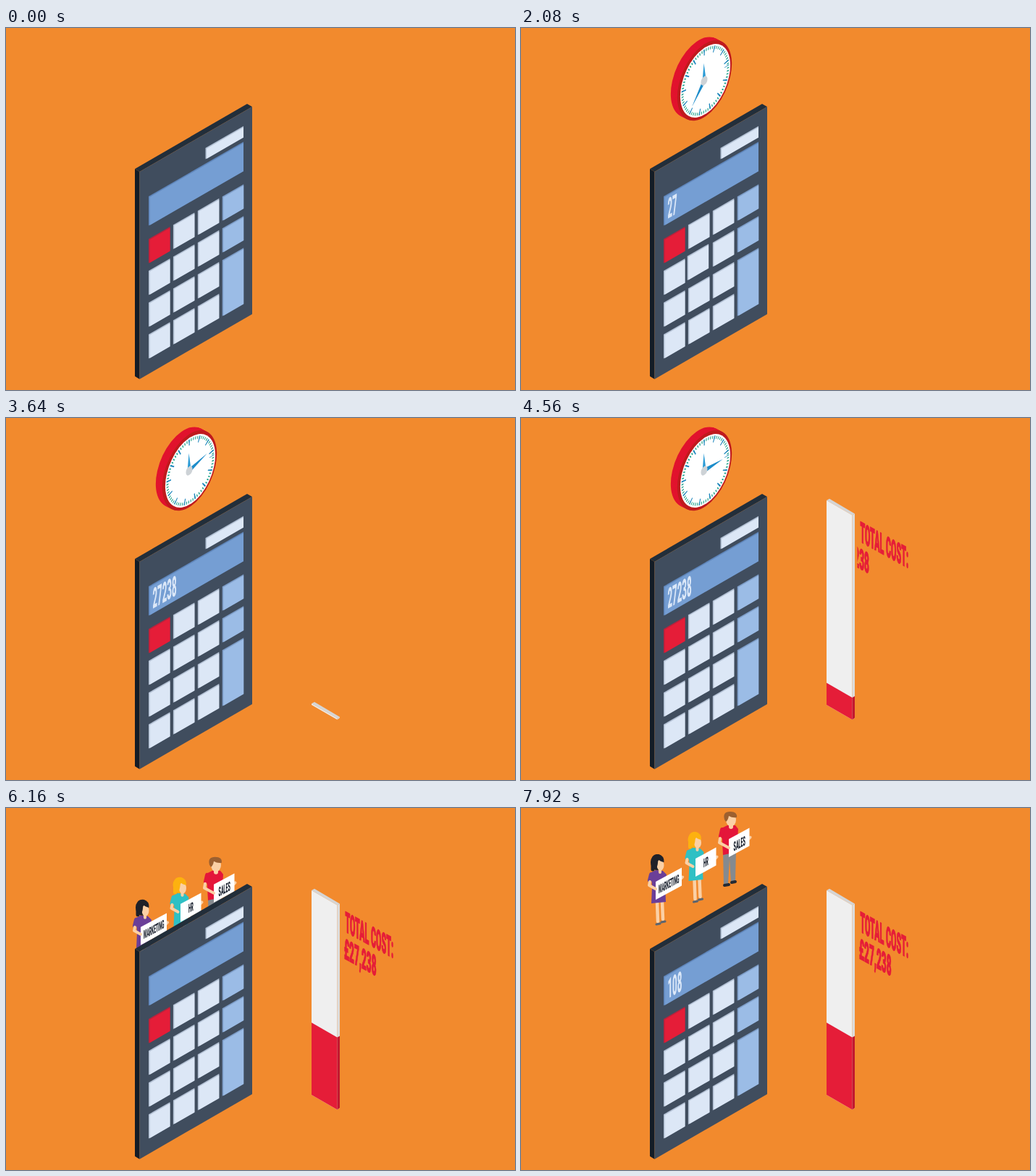
Animation of 703x501 px, one loop 8 s. Source, as an HTML page:

```html
<!DOCTYPE html>
<html lang="en">
<head>
<meta charset="utf-8">
<title>Cost calculator</title>
<style>
html, body { margin: 0; width: 100%; height: 100%; overflow: hidden; background: #f28a2d; }
svg { display: block; width: 100vw; height: 100vh; }
text { font-family: Roboto, "Liberation Sans", sans-serif; font-weight: 900; }
</style>
</head>
<body>
<svg id="stage" viewBox="0 0 703 501"></svg>
<script>
const LOOP = 8000;
const SLOPE = 0.577;
const SKIN = '#fbd0a5';
const RED = '#e51d38';

const stage = document.getElementById('stage');
const clamp = v => Math.min(1, Math.max(0, v));
const span = (t, from, to) => clamp((t - from) / (to - from));
const smooth = p => p * p * (3 - 2 * p);
const easeOut = p => 1 - (1 - p) ** 2;
const easeInOut = p => p < 0.5 ? 4 * p ** 3 : 1 - 4 * (1 - p) ** 3;
const easeInBack = p => p * p * (2.3 * p - 1.3);

const poly = (points, fill, extra = '') => `<polygon points="${points}" fill="${fill}" ${extra}/>`;
const line = (d, color, width) =>
  `<path d="${d}" fill="none" stroke="${color}" stroke-width="${width}" stroke-linecap="round" stroke-linejoin="round"/>`;
const ellipse = (cx, cy, rx, ry, fill) =>
  `<ellipse cx="${cx}" cy="${cy}" rx="${rx}" ry="${ry}" fill="${fill}"/>`;

// Upright panel whose top edge climbs to the right.
const panel = (x, y, w, h, fill) => {
  const rise = w * SLOPE;
  return poly(`${x},${y} ${x + w},${y - rise} ${x + w},${y - rise + h} ${x},${y + h}`, fill);
};
const bevelled = (x, y, w, h, fill, edge) =>
  panel(x, y, w, h, edge) + panel(x + 1.6, y + 0.9, w - 1.6, h - 1.5, fill);

// ---- clock ----
const FACE = '34.5 -24 2 45';
const disc = (x, y, r, fill) =>
  `<circle r="${r}" fill="${fill}" transform="matrix(${FACE} ${x} ${y})"/>`;
const ring = (r, width, color, count, dash) =>
  `<circle r="${r}" fill="none" stroke="${color}" stroke-width="${width}" pathLength="${count}"
    stroke-dasharray="${dash} ${1 - dash}" stroke-dashoffset="${dash / 2}"/>`;

function clockMarkup() {
  let rim = '';
  for (let i = 9; i > 0; i--) rim += disc(253.5 - i, 72.7 - i * 0.52, 1.09, '#e1132d');
  return `<g id="clock">${rim}
    ${disc(253.5, 72.7, 1.09, '#bf1a1d')}${disc(254.5, 73, 1, '#fff')}
    <g transform="matrix(${FACE} 254.5 73)">
      ${ring(0.91, 0.08, '#18a088', 60, 0.38)}${ring(0.86, 0.18, '#1d86bd', 12, 0.09)}
    </g>
    <g transform="matrix(${FACE} 253 73)">
      ${poly('-.075,0 .075,0 0,-.53', '#2a9bd6', 'transform="rotate(2)"')}
      ${poly('-.075,0 .075,0 0,-.74', '#1c8cca', 'id="minute"')}
      <circle r=".13" fill="#cdd2d6"/>
    </g></g>`;
}

// ---- people ----
function board(x, y, w, h, label, tx, ty, size) {
  return line(`M${x + w - 1} ${y - w * 0.54 + 15}l2 -2`, SKIN, 4) +
    poly(`${x},${y} ${x + w},${y - w * 0.54} ${x + w},${y - w * 0.54 + h} ${x},${y + h}`, '#fff') +
    `<text transform="matrix(.3 -.162 0 1 ${tx} ${ty})" font-size="${size}" fill="#1c2330">${label}</text>`;
}

function woman(x, y, hair, dress, sign) {
  return `<g transform="translate(${x} ${y})">
    ${line('M0 66L1 93', SKIN, 4.5)}${line('M7 66L8 90', SKIN, 4.5)}
    ${line('M-1 97l5 -1', '#5b6570', 3)}${line('M6 94l5 -1', '#5b6570', 3)}
    ${poly('-8,25 -2,22 8,23 13,28 11,42 12,66 -8,68 -7,46', dress)}
    ${ellipse(0, 11, 9, 11, hair)}${line('M-6 12V21', hair, 5)}
    ${ellipse(4.5, 15, 5, 7.5, SKIN)}${line('M4 20v5', SKIN, 4)}
    <path d="M-8 14Q-9 0 2 0Q10 2 9.5 11Q3 10 1 6Q2 14 -2 22Z" fill="${hair}"/>
    ${line('M-8 28L-10 36', dress, 6)}
    </g>${sign}<g transform="translate(${x} ${y})">
    ${line('M-10 38L-11 43L-2 48', SKIN, 4)}</g>`;
}

function man(x, y, sign) {
  return `<g transform="translate(${x} ${y})">
    ${poly('-10,54 8,54 7,96 1,98 -1,66 -3,100 -9,101', '#858a8f')}
    ${line('M-8 102l6 -1', '#252a33', 4)}${line('M2 98l5 -1', '#252a33', 4)}
    ${poly('-12,23 -4,19 7,19 11,24 9,56 -10,60', '#e4163a')}
    ${ellipse(1, 11, 7, 9.5, SKIN)}${line('M1 18v3', SKIN, 6)}
    <path d="M-8 11Q-11 0 0 0Q10 0 9 8Q3 9 -2 6Q-3 12 -6 14Z" fill="#9c6030"/>
    ${line('M-11 25L-13 34', '#e4163a', 6)}
    </g>${sign}<g transform="translate(${x} ${y})">
    ${line('M-14 37L-15 43L-2 50', SKIN, 4)}</g>`;
}

const teamMarkup = () => `<g id="team">
  ${man(289, 5, board(287, 43, 28.5, 25, 'SALES', 293.5, 60, 18))}
  ${woman(239.5, 33, '#fdb10f', '#2fc0c4', board(241, 70, 28.5, 25, 'HR', 252, 82.5, 17))}
  ${woman(188, 64, '#1f2128', '#6b3f98', board(186, 102, 36, 25, 'MARKETING', 190, 118.5, 16.5))}
</g>`;

// ---- calculator ----
function keyMarkup(col, row) {
  const x = 197 + col * 33.9;
  const y = 292 - (x - 197) * SLOPE + row * 44;
  const tall = col === 3 && row === 2;
  let colors = ['#dce7f6', '#b3c1d4'];
  if (col === 3) colors = ['#9bbce6', '#7d9dc8'];
  if (!col && !row) colors = [RED, '#b8223c'];
  return `<g id="key${col}${row}">${bevelled(x, y, 29.5, tall ? 77.5 : 33.5, ...colors)}</g>`;
}

function calculatorMarkup() {
  let keys = '';
  for (let col = 0; col < 4; col++)
    for (let row = 0; row < (col === 3 ? 3 : 4); row++) keys += keyMarkup(col, row);
  return poly('178,195 333,105 340,109 184.5,199', '#222e3a') +
    poly('178,195 184.5,199 184.5,486 178,482', '#141c26') +
    poly('184.5,199 340,109 340,396 184.5,486', '#404d5e') +
    bevelled(275.5, 166, 52.5, 15.5, '#dce7f6', '#b3c1d4') +
    bevelled(197, 233, 131, 40.5, '#759ed3', '#5f86bb') + keys +
    `<text id="digits" transform="matrix(.292 -.168 0 1 202.5 264)" font-size="39" fill="#dce8f8"></text>`;
}

// ---- bar and cost ----
const BAR_BASE = 397;
const barMarkup = () => `<g id="bar">
  ${poly('', '#d5d5d5', 'id="barTop"')}${poly('', '#efefef', 'id="barFront"')}${poly('', '#dcdcdc', 'id="barSide"')}
  ${poly('', RED, 'id="fillFront"')}${poly('', '#c2182f', 'id="fillSide"')}</g>
  <clipPath id="reveal"><rect x="464.5" y="0" width="238.5" height="501"/></clipPath>
  <g clip-path="url(#reveal)" fill="${RED}" stroke="${RED}" stroke-width="1.4">
    <g id="title"><text transform="matrix(.275 .153 0 1 468.5 171)" font-size="39">TOTAL COST:</text></g>
    <g id="cost"><text transform="matrix(.303 .168 0 1 467 208)" font-size="39">£27,238</text></g>
  </g>`;

stage.innerHTML = '<rect width="703" height="501" fill="#f28a2d"/>' +
  clockMarkup() + teamMarkup() + calculatorMarkup() + barMarkup();

const $ = id => document.getElementById(id);
const show = (id, on) => $(id).setAttribute('display', on ? 'inline' : 'none');
const move = (id, x, y) => $(id).setAttribute('transform', `translate(${x} ${y})`);
const slide = (id, distance) => move(id, -distance, -distance * 0.555);

function column(front, side, y) {
  $(front).setAttribute('points', `422,${y} 457.5,${y + 20.5} 457.5,417.5 422,${BAR_BASE}`);
  $(side).setAttribute('points', `457.5,${y + 20.5} 461,${y + 18.5} 461,415 457.5,417.5`);
}

// start time, key, digit
const PRESS = 300;
const firstSum = [[1070, '03', 2], [1550, '21', 7], [2030, '11', 2], [2510, '22', 3], [2990, '13', 8]];
const secondSum = [[6490, '01', 1], [7050, '20', 0], [7610, '13', 8]];

function drawKeys(t) {
  const sum = t < 6000 ? firstSum : secondSum;
  const depth = {};
  for (const [start, key] of [...firstSum, ...secondSum])
    depth[key] = (depth[key] || 0) + Math.sin(Math.PI * span(t, start, start + PRESS));
  for (const key in depth) move('key' + key, -2.5 * depth[key], -1.4 * depth[key]);
  $('digits').textContent = sum.filter(p => t >= p[0] + PRESS / 2).map(p => p[2]).join('');
  $('digits').setAttribute('opacity', t < 6000 ? 1 - span(t, 5400, 5640) : 1);
}

function drawClock(t) {
  const shift = t < 5280
    ? 170 * (1 - easeOut(span(t, 80, 360)))
    : 170 * easeInBack(span(t, 5280, 5621));
  show('clock', t > 80 && t < 5640);
  move('clock', 0, shift);
  $('minute').setAttribute('transform', `rotate(${93 + 360 * smooth(span(t, 720, 4040))})`);
}

function drawBar(t) {
  const top = BAR_BASE - 283 * easeOut(span(t, 3640, 3960));
  const fill = BAR_BASE - 100 * easeInOut(span(t, 4400, 4780));
  show('bar', t > 3640);
  column('barFront', 'barSide', top);
  $('barTop').setAttribute('points',
    `422,${top} 426,${top - 2.3} 461,${top + 18.5} 457.5,${top + 20.5}`);
  column('fillFront', 'fillSide', fill);
  show('fillFront', t > 4400);
  show('fillSide', t > 4400);
  show('title', t > 3960);
  slide('title', 75 * (1 - easeOut(span(t, 3960, 4160))));
  show('cost', t > 4390);
  slide('cost', 50 * (1 - smooth(span(t, 4400, 4780))));
}

function drawTeam(t) {
  show('team', t > 6020);
  move('team', 0, 300 * (1 - easeOut(span(t, 6020, 6280))));
}

const begin = performance.now();
function frame() {
  const t = (performance.now() - begin) % LOOP;
  drawClock(t);
  drawTeam(t);
  drawKeys(t);
  drawBar(t);
  requestAnimationFrame(frame);
}
frame();
</script>
</body>
</html>
```
